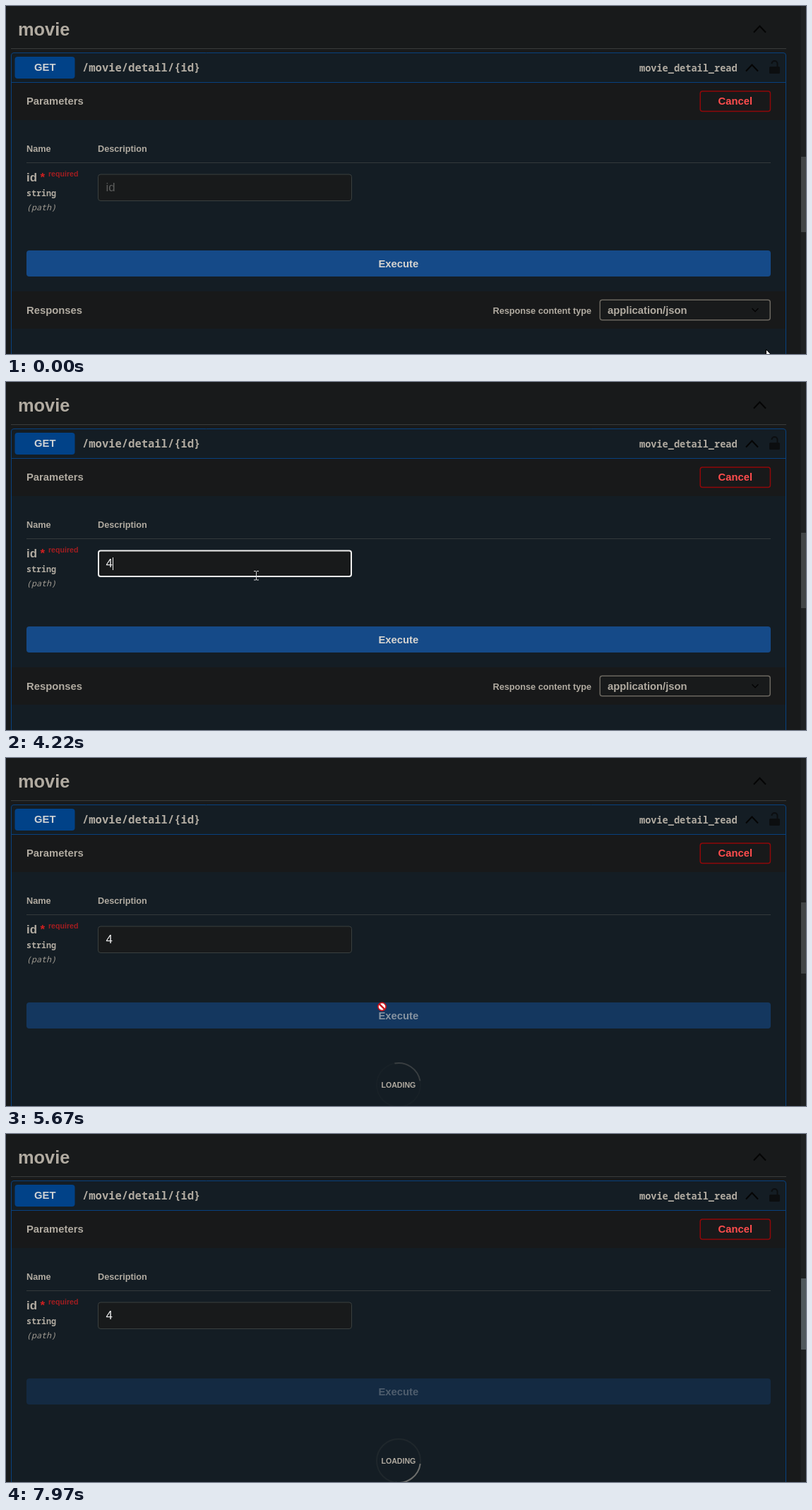
These frames come from a looping animation (1133 px wide and 494 px high, 8 s). An HTML page with a canvas:

```html
<!DOCTYPE html>
<html lang="en">
<head>
<meta charset="utf-8">
<title>API explorer</title>
<style>
  html, body { margin: 0; width: 100%; height: 100%; overflow: hidden; background: #181a1b; }
  canvas { display: block; }
</style>
</head>
<body>
<canvas id="stage" width="1133" height="494"></canvas>
<script>
const ctx = document.getElementById('stage').getContext('2d');
const LOOP = 8000;
const SANS = '"Liberation Sans", Arial, sans-serif';
const MONO = '"Noto Sans Mono", "DejaVu Sans Mono", monospace';
const PAGE = '#181a1b', PANEL = '#141d24', BAR = '#18191a', BLUE = '#08417f';
const INK = '#b1aba1', WHITE = '#f0f0f0', BLACK = '#050505';

const FOCUS = 2660, TYPED = 3820, BLUR = 5160, SENT = 5575, LOADING = 5650, THUMB_HOVER = 6900;
const BLINK = 530;

const clamp = v => Math.max(0, Math.min(1, v));
const linear = p => p;
const smooth = p => p * p * p * (10 - 15 * p + 6 * p * p);
const easeOut = p => 1 - (1 - p) ** 3;
const fade = p => 1 - (1 - clamp(p)) ** 2.3;

const START = { x: 1078, y: 488 };
const MOVES = [
  { from: 0, to: 70, x: 904, y: 409, ease: linear },
  { from: 290, to: 640, x: 794, y: 327, ease: smooth },
  { from: 1060, to: 1160, x: 781, y: 316, ease: linear },
  { from: 1420, to: 2050, x: 278, y: 257, ease: smooth, bend: -35 },
  { from: 4150, to: 4760, x: 522, y: 356, ease: easeOut, bend: -16 },
  { from: 5580, to: 6310, x: 1140, y: 190, ease: smooth, bend: -8 }
];

function pointerAt(t) {
  let { x, y } = START;
  for (const move of MOVES) {
    const p = move.ease(clamp((t - move.from) / (move.to - move.from)));
    x += (move.x - x) * p;
    y += (move.y - y) * p + (move.bend || 0) * Math.sin(Math.PI * p);
  }
  return [Math.round(x), Math.round(y)];
}

function rect(x, y, w, h, color) {
  ctx.fillStyle = color;
  ctx.fillRect(x, y, w, h);
}

function paint(fill, stroke, line) {
  if (fill) { ctx.fillStyle = fill; ctx.fill(); }
  if (stroke) { ctx.strokeStyle = stroke; ctx.lineWidth = line; ctx.stroke(); }
}

function box(x, y, w, h, { fill, stroke, line = 1, radius = 4 }) {
  const inset = stroke ? line / 2 : 0;
  ctx.beginPath();
  ctx.roundRect(x + inset, y + inset, w - 2 * inset, h - 2 * inset, radius - inset);
  paint(fill, stroke, line);
}

function arc(x, y, radius, from, to, { fill, stroke, line }) {
  ctx.beginPath();
  ctx.arc(x, y, radius, from, to);
  paint(fill, stroke, line);
}

function text(str, x, y, size, { color = INK, style = 'bold', family = SANS } = {}) {
  ctx.font = `${style} ${size}px ${family}`;
  ctx.fillStyle = color;
  ctx.fillText(str, x, y);
}

function polyline(points, color, width) {
  ctx.beginPath();
  points.forEach(([x, y]) => ctx.lineTo(x, y));
  paint(null, color, width);
}

function chevron(x, y, w, h, width) {
  polyline([[x - w, y + h], [x, y - h], [x + w, y + h]], BLACK, width);
}

function lock() {
  box(1081, 86, 15, 10, { fill: '#0c0e10', radius: 1.5 });
  arc(1088.5, 82, 4, Math.PI, 2 * Math.PI, { stroke: '#0c0e10', line: 2 });
  rect(1091.5, 82, 2, 4, '#0c0e10');
}

function drawHeader() {
  text('movie', 17, 42, 25.4);
  chevron(1067.5, 33, 8.5, 4.5, 2);
  rect(7, 60, 1098, 1, '#393b3b');
  box(7, 66, 1098, 440, { fill: PANEL, stroke: BLUE });
  rect(8, 108, 1096, 1, BLUE);
  box(12.5, 72, 85, 31, { fill: '#014288' });
  text('GET', 40, 92, 14.8, { color: '#d0d3d5' });
  text('/movie/detail/{id}', 108, 93, 15.5, { family: MONO });
  text('movie_detail_read', 897, 93, 13.6, { family: MONO });
  chevron(1056.5, 88, 8.5, 4.5, 2);
  lock();
  rect(8, 109, 1096, 53, BAR);
  text('Parameters', 29, 140, 14.8);
  box(982.5, 120.3, 100.7, 30, { stroke: '#8f0709', line: 1.5 });
  text('Cancel', 1008.5, 140, 14.8, { color: '#ff4d4d' });
}

// The caret restarts its blink on focus and on each key press
function caretVisible(t) {
  const since = t - (t < TYPED ? FOCUS : TYPED);
  return Math.floor(since / BLINK) % 2 === 0;
}

function drawParameters(t) {
  const focused = t >= FOCUS && t < BLUR;
  const typed = t >= TYPED;
  text('Name', 29, 207, 12.7);
  text('Description', 130, 207, 12.7);
  rect(29, 222, 1054, 1, '#343a3c');
  text('id', 29, 249, 16.9);
  text('*', 48.5, 249, 16.9, { color: '#d02020' });
  text('required', 60, 242, 10.6, { color: '#a11d20' });
  text('string', 29, 270, 11.7, { family: MONO });
  text('(path)', 29, 290, 11.7, { color: '#a09b92', style: 'italic', family: MONO });
  box(130, 238.5, 360, 38.5, {
    fill: PAGE, stroke: focused ? WHITE : '#3a403f', line: focused ? 2 : 1
  });
  text(typed ? '4' : 'id', 141.5, 263, 16.9, { color: typed ? WHITE : '#5b5c5b', style: 'normal' });
  if (focused && caretVisible(t)) rect(typed ? 151 : 142, 249, 1, 18, WHITE);
}

function drawExecute(t) {
  ctx.globalAlpha = 1 - 0.7 * fade((t - SENT) / 300);
  box(29, 347, 1054, 37, { fill: '#154a88' });
  text('Execute', 527.5, 371, 14.8, { color: '#d6d4d0' });
  ctx.globalAlpha = 1;
}

function drawResponses() {
  rect(8, 405, 1096, 53, BAR);
  text('Responses', 29, 437, 14.8);
  text('Response content type', 689.5, 437, 12.7);
  box(840.5, 416.5, 242.5, 30, { fill: PAGE, stroke: '#6b675f', line: 1.5 });
  text('application/json', 852, 437, 14.8);
  chevron(1061, 431.5, 4.5, -2.2, 1.6);
}

function drawSpinner(t) {
  const turn = (t - SENT) / 1000 * 2 * Math.PI - Math.PI / 2;
  const quarter = Math.PI / 4;
  ctx.globalAlpha = fade((t - SENT) / 500);
  arc(556, 464, 31, 0, 2 * Math.PI, { stroke: '#1f272c', line: 2 });
  arc(556, 464, 31, turn - quarter, turn + quarter, { stroke: '#6c6d6b', line: 2 });
  ctx.globalAlpha = 1;
  text('LOADING', 531.5, 468, 10.6);
}

function drawScrollbar(t) {
  rect(1126, 0, 7, 494, '#1e2021');
  if (t < LOADING) rect(1126, 214, 7, 107, '#424546');
  else rect(1126, 205, 7, 101, t < THUMB_HOVER ? '#424546' : '#50585c');
}

const cursors = {
  arrow() {
    ctx.beginPath();
    ctx.moveTo(0, 0);
    ctx.lineTo(0, 15.5);
    ctx.lineTo(3.5, 12.3);
    ctx.lineTo(6, 17.6);
    ctx.lineTo(8.4, 16.5);
    ctx.lineTo(6, 11.4);
    ctx.lineTo(10.8, 11.2);
    ctx.closePath();
    paint('#fff', '#000', 1);
  },
  beam() {
    rect(-0.5, -5.5, 1, 12, '#d5d7d8');
    for (const y of [-6.5, 6]) {
      rect(-3.5, y, 3, 1, '#d5d7d8');
      rect(0.5, y, 3, 1, '#d5d7d8');
    }
  },
  hand() {
    const look = { fill: '#fff', stroke: '#000', radius: 3 };
    box(-5, 8, 15, 13, look);
    box(-2, 0, 4, 14, { ...look, radius: 2 });
    rect(-1, 9, 2, 6, '#fff');
  },
  blocked() {
    arc(0, -0.5, 5.6, 0, 2 * Math.PI, { fill: '#fff', stroke: '#c8141c', line: 1.7 });
    polyline([[-3.7, -4.2], [3.7, 3.2]], '#c8141c', 2.4);
  }
};

function cursorKind(x, y, t) {
  const inside = (left, top, right, bottom) => x >= left && x <= right && y >= top && y <= bottom;
  if (inside(130, 239, 490, 277)) return 'beam';
  if (inside(29, 347, 1083, 384)) return t < SENT ? 'hand' : 'blocked';
  return 'arrow';
}

function drawPointer(t) {
  const [x, y] = pointerAt(t);
  ctx.save();
  ctx.translate(x + 0.5, y + 0.5);
  cursors[cursorKind(x, y, t)]();
  ctx.restore();
}

function draw(t) {
  rect(0, 0, 1133, 494, PAGE);
  drawHeader();
  drawParameters(t);
  drawExecute(t);
  if (t < LOADING) drawResponses();
  else drawSpinner(t);
  drawScrollbar(t);
  drawPointer(t);
}

const began = performance.now();
function tick() {
  draw((performance.now() - began) % LOOP);
  requestAnimationFrame(tick);
}
tick();
</script>
</body>
</html>
```
